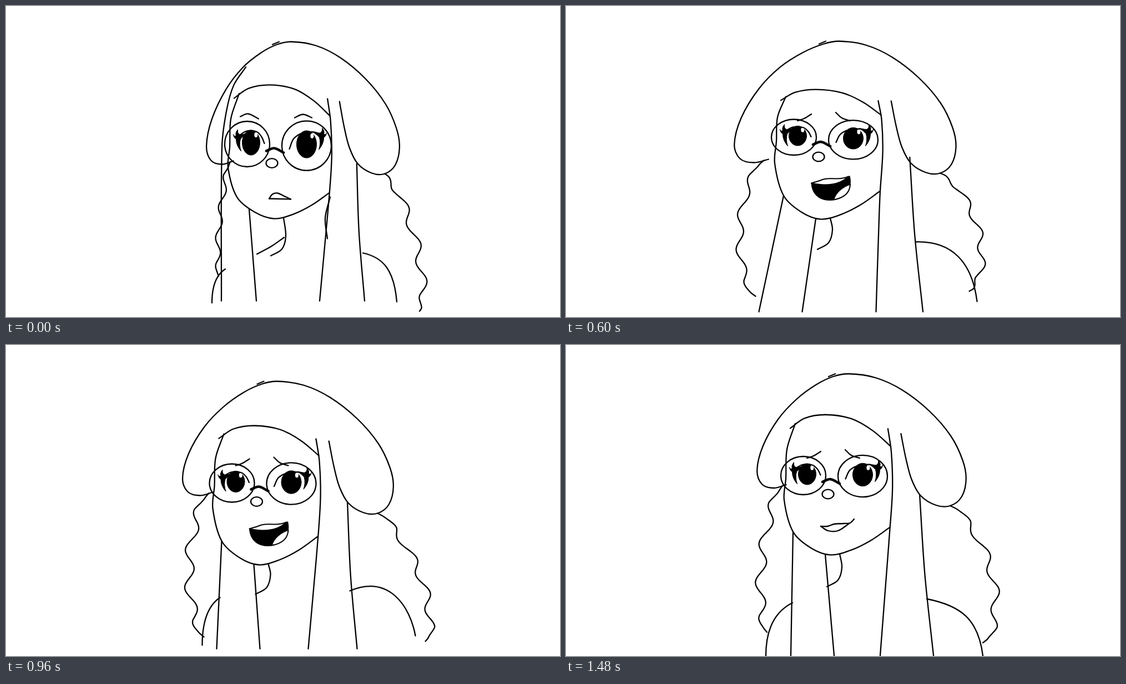
An HTML page that plays this animation: 998 by 561 pixels, repeating every 1.77 s.

```html
<!DOCTYPE html>
<html lang="en">
<head>
<meta charset="utf-8">
<title>Girl in a floppy hat</title>
<style>
html, body { margin: 0; width: 100%; height: 100%; overflow: hidden; background: #fff; }
svg { display: block; width: 100%; height: 100%; fill: none; stroke: #000; stroke-width: 2.3; stroke-linecap: round; stroke-linejoin: round; }
.bold { stroke-width: 4.6; }
.ink { fill: #000; stroke-width: 1; }
.white { fill: #fff; stroke-width: 2; }
.glint { fill: #fff; stroke: none; }
</style>
</head>
<body>
<svg id="stage" viewBox="0 0 998 561"></svg>
<script>
const LOOP = 1770;

// One rig, posed by a few settings. All places are relative to the middle of the glasses.
// hat: [drop, left width, right width, droop of left flap]; feet: x of the four strand ends
// curl: [end x, end y, bulge, wave size, first outward crest]
// armL: [from, to]; armR: [from, to, lift]
const turned = {
  tilt: 0.5, lens: 34.5, up: 1, chin: 1, hat: [0, 1, 1, 0], feet: [-81, -3, 84, 172], floor: 556,
  curlL: [-104, 277, -31, 9, 0.12], curlR: [270, 301, 46, 8, 0.35], mouth: 'gape', mouthY: 82
};
const front = {
  ...turned, parted: true, tilt: 4, lens: 30, floor: 547,
  curlL: [-117, 234, -15, 6, 0.12], curlR: [257, 300, 25, 8, 0.24]
};

const ask = {
  ...front, eye: [488, 250.5], tilt: 1.5, lens: 41, up: 1.04, chin: 0.905, hat: [-2, 0.9, 0.94, 15],
  feet: [-100, -37, 77, 158], floor: 532, curlL: [-105, 237, -8, 5, 0.12],
  armL: [-93, 224, -117, 285], armR: [155, 195, 216, 283, 8],
  collar: [-36, 197, -10, 183, 13, 167], nape: [96, 94, 87, 132, 91, 169],
  arched: true, mouth: 'flat', mouthY: 97
};
const doubt = {
  ...front, eye: [491, 224], up: 0.78, chin: 1.03, hat: [13, 1.03, 0.98, 28],
  feet: [-110, -44, 74, 162], openJaw: true,
  armL: [-106, 211, -121, 308], armR: [152, 200, 230, 298, -22],
  collar: [-48, 198, -22, 214, -2, 210], mouth: 'pout', mouthY: 86
};
const laugh = {
  ...front, eye: [491, 216], up: 0.7, chin: 0.98, hat: [14, 1.28, 1.04, 26],
  feet: [-152, -74, 105, 186], openJaw: true, shut: true,
  curlL: [-145, 292, -33, 6, 0.12], curlR: [235, 315, 54, 7, 0.24],
  armR: [169, 192, 247, 299, -12],
  collar: [-68, 187, -38, 193, -2, 226], nape: [110, 118, 87, 160, 107, 209],
  mouth: 'smile', mouthY: 79
};
const greet = {
  ...turned, eye: [437, 262], hat: [3, 1, 0.99, 0], armR: [163, 181, 306, 289, 8],
  curlL: [-100, 277, -39, 8, 0.12], curlR: [290, 236, 33, 7, 0.22]
};
const rise = {
  ...turned, eye: [460.5, 249.5], hat: [0, 1.01, 1.01, 0], floor: 548,
  armL: [-75, 206, -107, 292], armR: [159, 194, 277, 275, -30], curlR: [295, 285, 35, 8, 0.35]
};
const talk = {
  ...turned, eye: [475, 246], hat: [0, 1.02, 0.98, 0],
  armL: [-75, 204, -99, 315], armR: [162, 198, 268, 315, 3]
};
const smile = {
  ...turned, eye: [481, 236], up: 1.06, chin: 0.97, hat: [0, 0.97, 1.02, 0], floor: 560,
  feet: [-76, 2, 85, 181], curlL: [-119, 282, -23, 9, 0.12],
  armL: [-73, 229, -121, 325], armR: [169, 222, 270, 325, 12], mouth: 'smile', mouthY: 91
};

const pairs = n => n.flatMap((x, i) => i % 2 ? [] : [[x, n[i + 1]]]);
const pts = text => pairs(text.split(' ').map(Number));

const HAT = pts('-87 16 -110 22 -132 15 -141 -10 -130 -54 -102 -102 -68 -138 -32 -164 0 -179 28 -184 75 -177 122 -155 170 -117 208 -72 229 -28 235 6 227 38 207 54 182 53 155 36 139 7 129 -30 120 -76');
const FACE = pts('-68 -89 -83 -45 -85 5 -88 45 -72 104 -40 134 -5 147 32 138 67 120 100 96');
const BAND = pts('-77 -81 -51 -98 -13 -104 33 -97 70 -77 102 -50');
const PARTING = pts('-56 -135 -78 -103 -91 -58 -99 5');
const SIDE = pts('97 -80 103 -40 105 25 100 105');
const BRIDGE = pts('-19 11 -5 6 12 14');
const BROWS = [pts('-47 -32 -35 -36 -22 -44'), pts('22 -47 33 -37 48 -32')];
const ARCHES = [pts('-66 -51 -52 -56 -33 -47'), pts('32 -49 47 -55 63 -49')];
const LIDS = [pts('-16 -12 -1 -20 17 -19 26 -11 31 -1'), pts('27 -17 13 -21 -6 -20 -23 -11 -31 5')];
const SHUT = [pts('-24 1 -10 -3 7 -5 26 1'), pts('36 0 8 -10 -11 -13 -24 -11')];
const LIPS = {
  flat: [pts('-14 0 -8 -8 1 -10 12 -5 25 1'), pts('-14 0 25 1')],
  pout: [pts('-21 0 -15 -7 -6 -8 9 -4 28 -5'), pts('-21 0 -11 6 4 6 28 -5')],
  smile: [pts('-22 0 -10 0 2 -4 19 -5 31 -6 38 -13'), pts('-22 0 -9 8 9 8 29 -5')]
};
const LASH = 'M-9-3Q-8 3-4 5Q-4 17 5 27Q1 15 4 5Q8 0 16-5Q6-3 3-3Q-2-5-1-12Q-6-6-4-1Q-8 1-9-3Z';
const SHUT_LASH = 'M-4-7Q-1-3 4-3Q6-6 7-12Q9-6 15-5L10 2L-2 5Z';

const path = (d, cls = '', at = [0, 0], flip = 1) =>
  `<path class="${cls}" d="${d}" transform="translate(${at}) scale(${flip} 1)"/>`;
const oval = (cx, cy, rx, ry, cls = '') =>
  `<ellipse class="${cls}" cx="${cx}" cy="${cy}" rx="${rx}" ry="${ry}"/>`;

// Smooth path; each handle is a third of its own segment
function curve(p, cls) {
  const dir = p.map((_, i) => {
    const a = p[Math.max(i - 1, 0)], b = p[Math.min(i + 1, p.length - 1)];
    const len = Math.hypot(b[0] - a[0], b[1] - a[1]);
    return [(b[0] - a[0]) / len, (b[1] - a[1]) / len];
  });
  let d = 'M' + p[0];
  for (let i = 1; i < p.length; i++) {
    const [a, b] = [p[i - 1], p[i]], s = Math.hypot(b[0] - a[0], b[1] - a[1]) / 3;
    const handle = (q, v, k) => [q[0] + v[0] * k, q[1] + v[1] * k];
    d += `C${handle(a, dir[i - 1], s)} ${handle(b, dir[i], -s)} ${b}`;
  }
  return path(d, cls);
}

// Wavy lock: a bulging line with a sine wave on it
function curl(root, [x, y, bulge, size, crest]) {
  const line = [], steps = 44, waves = 3.7;
  for (let i = 0; i <= steps; i++) {
    const t = i / steps, fade = Math.min(1, t * 9, (1 - t) * 9);
    const wave = size * Math.sign(bulge) * Math.cos(2 * Math.PI * waves * (t - crest)) * fade;
    const bow = bulge * Math.sin(Math.PI * Math.min(t, 1 - t)) ** 0.6;
    line.push([root[0] + (x - root[0]) * t + bow + wave, root[1] + (y - root[1]) * t]);
  }
  return curve(line);
}

function eye(pose, side) {
  const flip = side ? -1 : 1, k = pose.lens / 35;
  const rx = side ? 44.5 : 40.5, ry = pose.lens * (side ? 1.09 : 1);
  const px = side ? 0 : 7, pw = side ? 18 : 16, ph = ry * 0.55;
  let svg = oval(0, 0, rx, ry);
  if (pose.shut) {
    svg += curve(SHUT[side], 'bold') + path(SHUT_LASH, 'ink', SHUT[side][0], flip);
  } else {
    const lid = LIDS[side].map(([x, y]) => [x, y * k]);
    svg += oval(px, -2.5, pw, ph, 'ink') + oval(px + pw * 0.55, -2.5 - ph * 0.62, 3, 4.5, 'glint') +
      curve(lid) + path(LASH, 'ink', lid[0], flip);
  }
  return `<g transform="translate(${side ? 53.5 : -53.5} ${side ? pose.tilt : -pose.tilt})">${svg}</g>`;
}

function mouth({ mouth: kind, mouthY }) {
  if (kind !== 'gape') return `<g transform="translate(0 ${mouthY})">${LIPS[kind].map(l => curve(l)).join('')}</g>`;
  const at = [-22, mouthY];
  return path('M0 0C1 20 14 31 33 31C55 31 76 14 69-13Q55 5 0 0Z', 'ink', at) +
    path('M40 30Q46 11 70 2Q69 25 40 30Z', 'white', at) +
    path('M0 0Q12-3 22-7Q30-9 45-8Q58-8 67-12Q50 4 22 3Q8 2 0 0Z', 'white', at);
}

function render(pose) {
  const { up, chin, feet, armL, armR, parted } = pose;
  const [drop, left, right, droop] = pose.hat, ground = pose.floor - pose.eye[1];
  const head = list => list.map(([x, y]) => [x < 0 ? x : x * right, y * (y < 0 ? up : chin)]);
  const strand = (root, i, bow = 0) =>
    curve([root, [(root[0] + feet[i]) / 2 + bow, (root[1] + ground) / 2], [feet[i], ground]]);

  const hat = HAT.map(([x, y]) => x < 0
    ? [x * left, y + drop + droop * Math.max(0, Math.min(1, (y + 140) / 140))]
    : [x * right, y + drop]);
  const rootL = [hat[0][0] * 0.7 + hat[1][0] * 0.3, hat[0][1] * 0.7 + hat[1][1] * 0.3];
  const face = head(FACE);

  let svg = curve(hat) + curve([[-8, drop - 179], [4, drop - 184]]) + curve(head(BAND)) +
    curve(pose.openJaw ? face.slice(0, 7) : face) +
    (parted ? curve([...head(PARTING), [feet[0], ground]]) : strand(face[4], 0)) +
    strand(parted ? [-50, 128 * chin] : [-14, 146 * chin], 1) +
    curve([...head(SIDE), [feet[2], ground]]) + strand([153 * right, 34], 3, -3) +
    curve([[12, 145 * chin], [16, 165], [9, 188], [-11, 200]]) +
    curl(rootL, pose.curlL) + curl(hat[17], pose.curlR);

  if (armL) {
    const [x, y, ex, ey] = armL;
    svg += path(`M${x} ${y}Q${ex} ${y + (ey - y) * 0.25} ${ex} ${ey}`);
  }
  const [x, y, ex, ey, lift] = armR, w = ex - x;
  svg += path(`M${x} ${y}C${x + w * 0.6} ${y + lift} ${ex - w * 0.08} ${y + (ey - y) * 0.35} ${ex} ${ey}`);
  for (const line of [pose.collar, pose.nape]) if (line) svg += curve(pairs(line));

  svg += eye(pose, 0) + eye(pose, 1) + curve(BRIDGE, 'bold') + oval(-9, 33, 10.5, 8.3) +
    (pose.arched ? ARCHES : BROWS).map(b => curve(b)).join('') + mouth(pose);
  return `<g transform="translate(${pose.eye})">${svg}</g>`;
}

// Halfway between two settings; switches take the later value
function between(a, b) {
  if (a === undefined) return b;
  if (typeof b === 'number') return (a + b) / 2;
  if (Array.isArray(b)) return b.map((v, i) => between(a[i], v));
  if (typeof b !== 'object') return b;
  return Object.fromEntries(Object.keys(b).map(k => [k, between(a[k], b[k])]));
}

const timeline = [
  [0, ask], [160, doubt], [280, between(doubt, laugh)], [400, laugh],
  [600, between(laugh, greet)], [720, greet], [840, between(greet, rise)], [960, rise],
  [1080, between(rise, talk)], [1200, talk], [1320, between(talk, smile)], [1480, smile]
].map(([start, pose]) => ({ start, svg: render(pose) }));

const stage = document.getElementById('stage');
const began = performance.now();
let shown;

function tick() {
  const time = (performance.now() - began) % LOOP;
  const cel = timeline.filter(c => c.start <= time).pop();
  if (cel !== shown) stage.innerHTML = (shown = cel).svg;
  requestAnimationFrame(tick);
}
tick();
</script>
</body>
</html>
```
